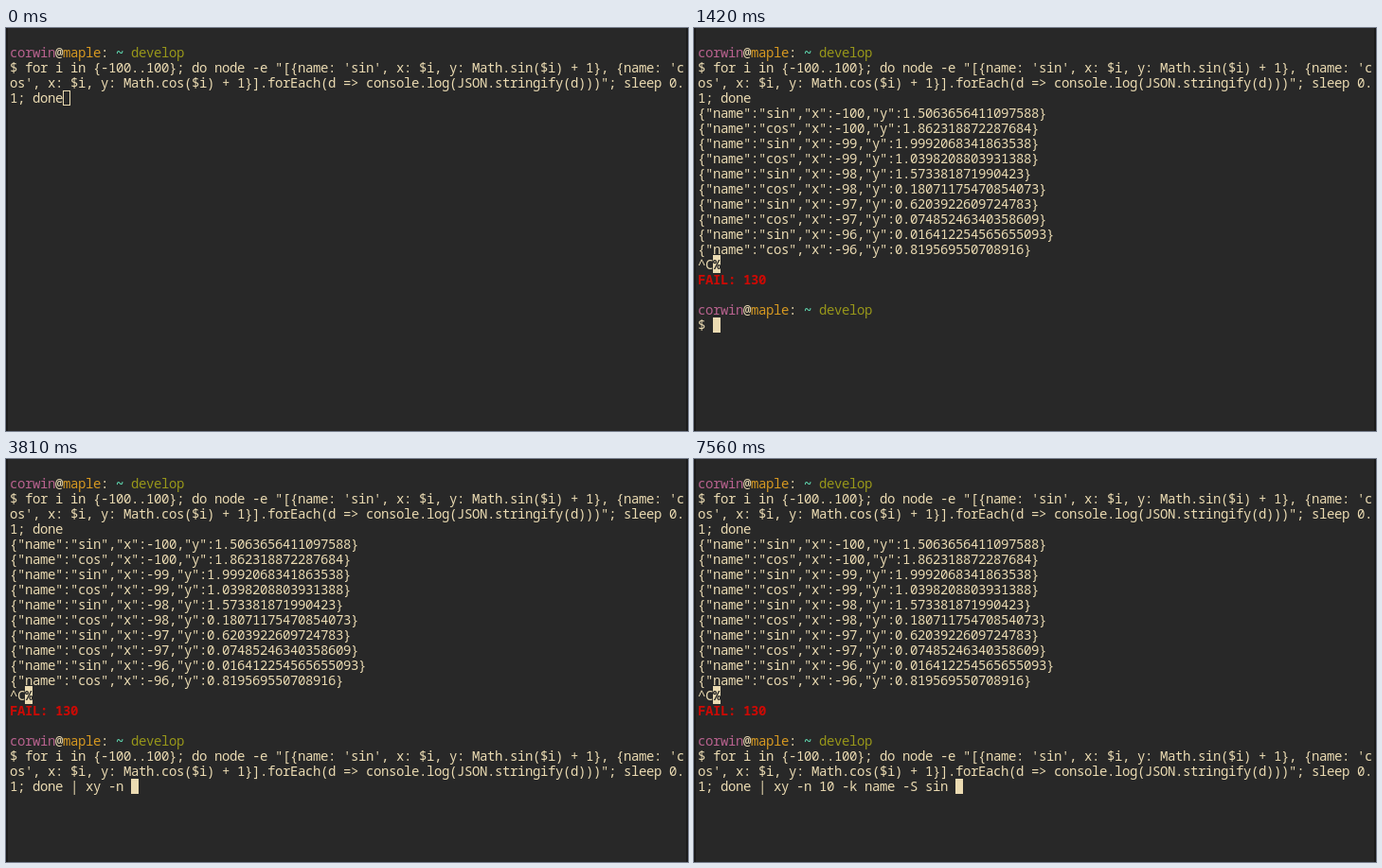
An HTML page that plays this animation: 720x426 px, repeating every 8000 ms.

```html
<!DOCTYPE html>
<html lang="en">
<head>
<meta charset="utf-8">
<title>Terminal session</title>
<style>
  html, body { margin: 0; width: 100%; height: 100%; overflow: hidden; background: #282828; }
  #stage {
    position: relative; width: 720px; height: 426px; overflow: hidden;
    background: #282828; box-shadow: inset 2px 0 #1b1b1b, inset -2px 0 #1b1b1b;
  }
  #screen {
    position: absolute; left: 4px; top: 2px; margin: 0; color: #ebdbb2;
    font: 14px/16px "Noto Sans Mono", "DejaVu Sans Mono", monospace;
    letter-spacing: calc(8px - 0.6em); font-variant-ligatures: none;
  }
  #cursor { position: absolute; width: 8px; height: 16px; box-sizing: border-box; border: 1px solid #ebdbb2; }
  .user { color: #b8628e; }
  .host { color: #d79921; }
  .path { color: #5fd7af; font-weight: 700; }
  .branch { color: #98971a; }
  .fail { color: #cc0a05; font-weight: 700; }
  .mark { background: #ebdbb2; color: #282828; font-weight: 700; }
</style>
</head>
<body>
<div id="stage"><pre id="screen"></pre><div id="cursor"></div></div>
<script>
const LOOP = 8000, COLS = 89, CELL = 8, ROW = 16, LEFT = 4, TOP = 2;
const screen = document.getElementById('screen');
const cursor = document.getElementById('cursor');

const span = (cls, text) => `<span class="${cls}">${text}</span>`;
const esc = s => s.replace(/&/g, '&amp;').replace(/</g, '&lt;').replace(/>/g, '&gt;');
const wrap = s => s.match(new RegExp(`.{1,${COLS}}`, 'g'));

const prompt = `${span('user', 'corwin')}@${span('host', 'maple')}: ${span('path', '~')} ${span('branch', 'develop')}`;
const command = `$ for i in {-100..100}; do node -e "[{name: 'sin', x: $i, y: Math.sin($i) + 1}, ` +
  `{name: 'cos', x: $i, y: Math.cos($i) + 1}].forEach(d => console.log(JSON.stringify(d)))"; sleep 0.1; done`;

const output = pairs => Array.from({ length: pairs * 2 }, (_, k) => {
  const name = k % 2 ? 'cos' : 'sin', x = (k >> 1) - 100;
  return JSON.stringify({ name, x, y: Math[name](x) + 1 });
});

const first = ['', prompt, ...wrap(command).map(esc)];
const stopped = [...first, ...output(5), '^C' + span('mark', '%'), span('fail', 'FAIL: 130'), '', prompt];

// Each step: start time, finished lines, line holding the cursor, hollow cursor
const steps = [];
const add = (at, lines, live, hollow = false) => steps.push({ at, lines, live, hollow });
const type = (text, from, to) => [...text].forEach((c, i) => {
  typed += c;
  addCommand(from + (to - from) * i / Math.max(1, text.length - 1));
});
const addCommand = at => {
  const rows = wrap(command + typed);
  const live = rows.pop();
  add(at, [...stopped, ...rows.map(esc)], live);
};

const ran = first.slice(0, -1), tail = wrap(command).pop();
add(0, ran, tail, true);
add(280, ran, tail);
[580, 620, 770, 930, 1080, 1240].forEach((at, n) => add(at, [...first, ...output(n)], ''));
add(1330, [...first, ...output(5)], '^C');
add(1420, stopped, '$ ');

let typed = '';
addCommand(1570);
type(' |', 1750, 1910);
type(' xy ', 2190, 2680);
type('-n 10', 3390, 4200);
type(' ', 4460, 4460);
type('-', 5150, 5150);
type('k name ', 5510, 6350);
type('-S sin ', 6670, 7560);

function show({ lines, live, hollow }) {
  screen.innerHTML = [...lines, esc(live)].join('\n').replace(/^/, '\u200b');
  cursor.style.left = LEFT + live.length * CELL + 'px';
  cursor.style.top = TOP + lines.length * ROW + 'px';
  cursor.style.background = hollow ? 'none' : '#ebdbb2';
}

let current;
const start = performance.now();
function frame(now) {
  const t = Math.max(0, now - start) % LOOP;
  const step = steps.findLast(s => s.at <= t + 0.5);
  if (step !== current) show(current = step);
  requestAnimationFrame(frame);
}
show(current = steps[0]);
requestAnimationFrame(frame);
</script>
</body>
</html>
```
